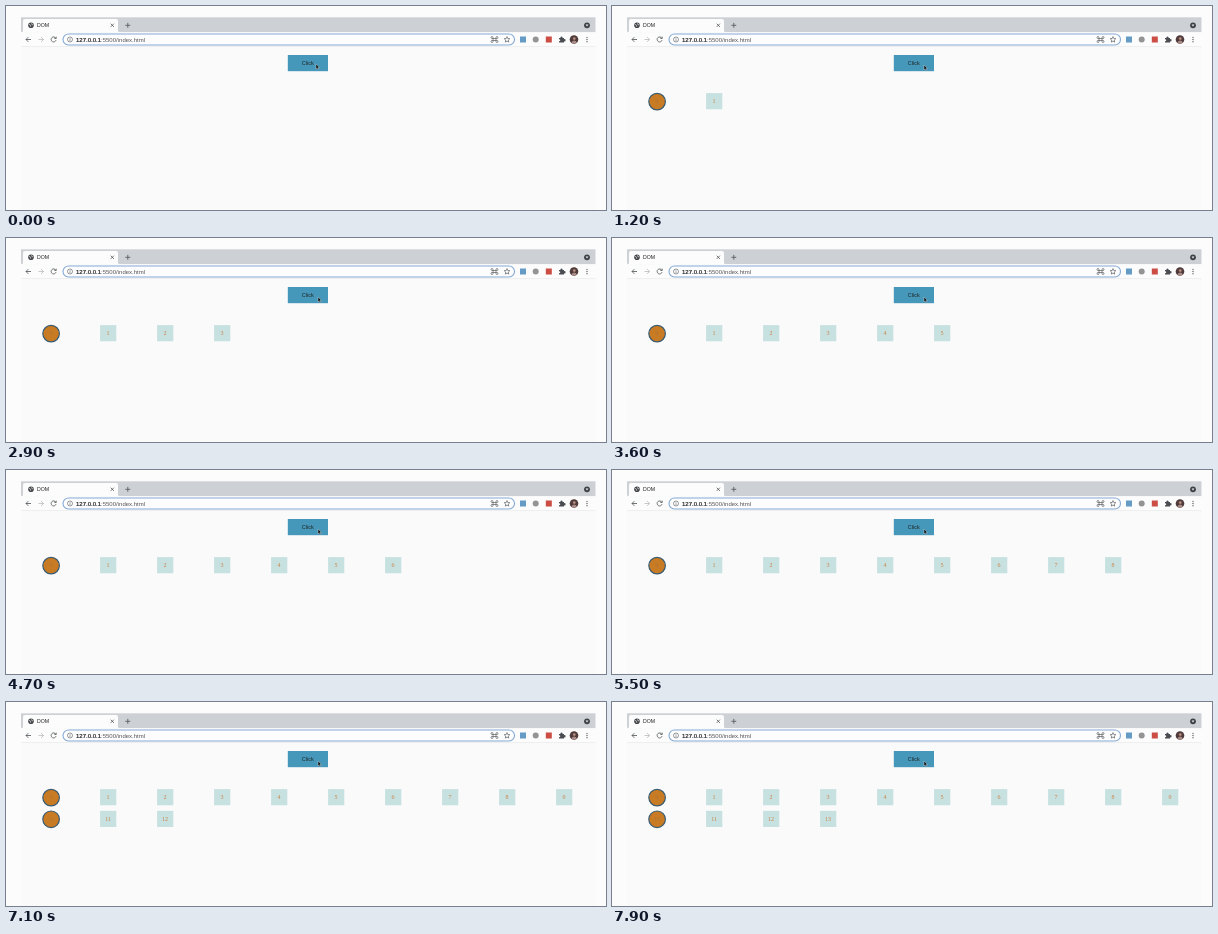
Animation, 600 px wide and 204 px high, one loop 8000 ms. Source, as an HTML page:

```html
<!DOCTYPE html>
<html lang="en">
<head>
<meta charset="utf-8">
<title>DOM</title>
<style>
  html, body { margin: 0; width: 100%; height: 100%; overflow: hidden; background: #fcfcfc; }
  svg { display: block; width: 600px; height: 204px; }
  text { font-family: "Liberation Sans", Arial, sans-serif; fill: #222; }
  .line { fill: none; stroke: #505357; stroke-width: .8; }
  .item text { font: 6px "Liberation Serif", "Times New Roman", serif; fill: #cb8145; text-anchor: middle; }
  .item rect { fill: #c6e1e0; }
  .item circle { fill: #c97b24; stroke: #385c73; stroke-width: 1.2; }
  .item.round text { fill: #a87537; }
  #cursor { animation: drift 8s infinite; }
  @keyframes drift {
    0%, 1.25% { transform: translate(310px, 58px); }
    5%, 100% { transform: translate(312px, 59px); }
  }
</style>
</head>
<body>
<svg viewBox="0 0 600 204">
  <rect width="600" height="204" fill="#fcfcfc"/>
  <rect x="15" y="40" width="574.5" height="164" fill="#fbfafb"/>

  <!-- tab strip -->
  <rect x="15" y="11.3" width="574.5" height="15" fill="#cdd1d6"/>
  <path d="M15 26.5q2 0 2-2V15q0-2 2-2h91q2 0 2 2v9.500q0 2 2 2z" fill="#fcfcfc"/>
  <circle cx="25" cy="19.300" r="2.800" fill="#44474b"/>
  <path d="M23 18.300l1.500.9.2 1.500M25.500 17.300l.3 1.200 1.300.4" fill="none" stroke="#e8e8e8" stroke-width=".7"/>
  <text x="31" y="21.200" font-size="5.2">DOM</text>
  <path class="line" d="M104.700 17.700l3.200 3.200m0-3.200l-3.200 3.200M119.300 19.300h5m-2.500-2.500v5"/>
  <circle cx="581" cy="19.300" r="2.900" fill="#3f4246"/>
  <path d="M579.600 18.600h2.800l-1.400 1.800z" fill="#eee"/>

  <!-- toolbar -->
  <rect x="15" y="26.300" width="574.500" height="14" fill="#fcfcfc"/>
  <path d="M15 40.600h574.500" stroke="#e4e4e6" stroke-width=".6"/>
  <path class="line" d="M25 33.500h-5m2.400-2.400l-2.400 2.400 2.400 2.400"/>
  <path class="line" style="stroke:#b9bbbe" d="M32.500 33.500h5m-2.400-2.400l2.400 2.400-2.400 2.400"/>
  <path class="line" d="M49.800 32.200a2.500 2.500 0 1 0 .2 2M50.200 30.700v1.800h-1.800"/>
  <rect x="57" y="28" width="451.500" height="11" rx="5.500" fill="#fdfdfd" stroke="#85aad6" stroke-width="1.100"/>
  <circle class="line" cx="64" cy="33.500" r="2.500" style="stroke-width:.6"/>
  <path class="line" d="M64 33.200v1.700m0-2.800v.6" style="stroke-width:.6"/>
  <text x="70" y="35.600" font-size="6"><tspan stroke="#222" stroke-width=".2">127.0.0.1</tspan><tspan fill="#555">:5500/index.html</tspan></text>
  <path class="line" style="stroke-width:.65" d="M487 32.500h3v2h-3zM487 32.500h-.8a1 1 0 1 1 .8-1zM490 32.500h.8a1 1 0 1 0-.8-1zM487 34.500h-.8a1 1 0 1 0 .8 1zM490 34.500h.8a1 1 0 1 1-.8 1z"/>
  <path class="line" style="stroke-width:.65" d="M501 30.600l.8 1.900 2 .2-1.500 1.400.4 2-1.700-1-1.700 1 .4-2-1.500-1.400 2-.2z"/>
  <rect x="514" y="30.500" width="6" height="6" fill="#659bc4"/>
  <circle cx="529.700" cy="33.500" r="3" fill="#929496"/>
  <rect x="539.800" y="30.500" width="6" height="6" fill="#cc4d43"/>
  <path d="M553 32h1.500a1.100 1.100 0 1 1 2 0h1.500v1.300a1.100 1.100 0 1 1 0 2v1.200h-5v-1.400a.9.900 0 1 0 0-1.700z" fill="#4a4d51"/>
  <circle cx="568" cy="33.500" r="4.300" fill="#503b3c"/>
  <circle cx="568.300" cy="32.600" r="1.400" fill="#b58b7d"/>
  <path d="M565.400 36.600q2.700-4.200 5.600 0q-2.800 2-5.600 0z" fill="#ad8e87"/>
  <g fill="#505357"><circle cx="581" cy="31.300" r=".65"/><circle cx="581" cy="33.500" r=".65"/><circle cx="581" cy="35.700" r=".65"/></g>

  <!-- page -->
  <rect x="281.800" y="49" width="40.200" height="16.200" fill="#4698bb"/>
  <text x="301.700" y="59.200" font-size="5.500" text-anchor="middle" fill="#111">Click</text>
  <g id="items"></g>
  <path id="cursor" d="M0 0v4.900l1.100-1 .8 1.700.9-.4-.8-1.600h1.500z" fill="#111" stroke="#e6eef2" stroke-width=".35"/>
</svg>
<script>
  const LOOP = 8000;
  const clicks = [600, 1100, 1800, 2500, 3000, 3500, 4200, 5000, 5400, 5800, 6200, 6700, 7100, 7500];
  const list = document.getElementById('items');

  function add(parent, tag, attrs) {
    const el = document.createElementNS('http://www.w3.org/2000/svg', tag);
    for (const key in attrs) el.setAttribute(key, attrs[key]);
    return parent.appendChild(el);
  }

  const items = clicks.map((time, n) => {
    const round = n % 10 === 0;
    const x = 45.1 + (n % 10) * 57;
    const y = 95.3 + Math.floor(n / 10) * 21.7;
    const g = add(list, 'g', { class: round ? 'item round' : 'item' });
    if (round) add(g, 'circle', { cx: x, cy: y + .3, r: 8.3 });
    else add(g, 'rect', { x: x - 8, y: y - 8.2, width: 16.2, height: 16.2 });
    add(g, 'text', { x, y: y + 2 }).textContent = n;
    return g;
  });

  function draw() {
    const t = performance.now() % LOOP;
    items.forEach((g, n) => { g.style.display = t >= clicks[n] ? '' : 'none'; });
    requestAnimationFrame(draw);
  }
  draw();
</script>
</body>
</html>
```
